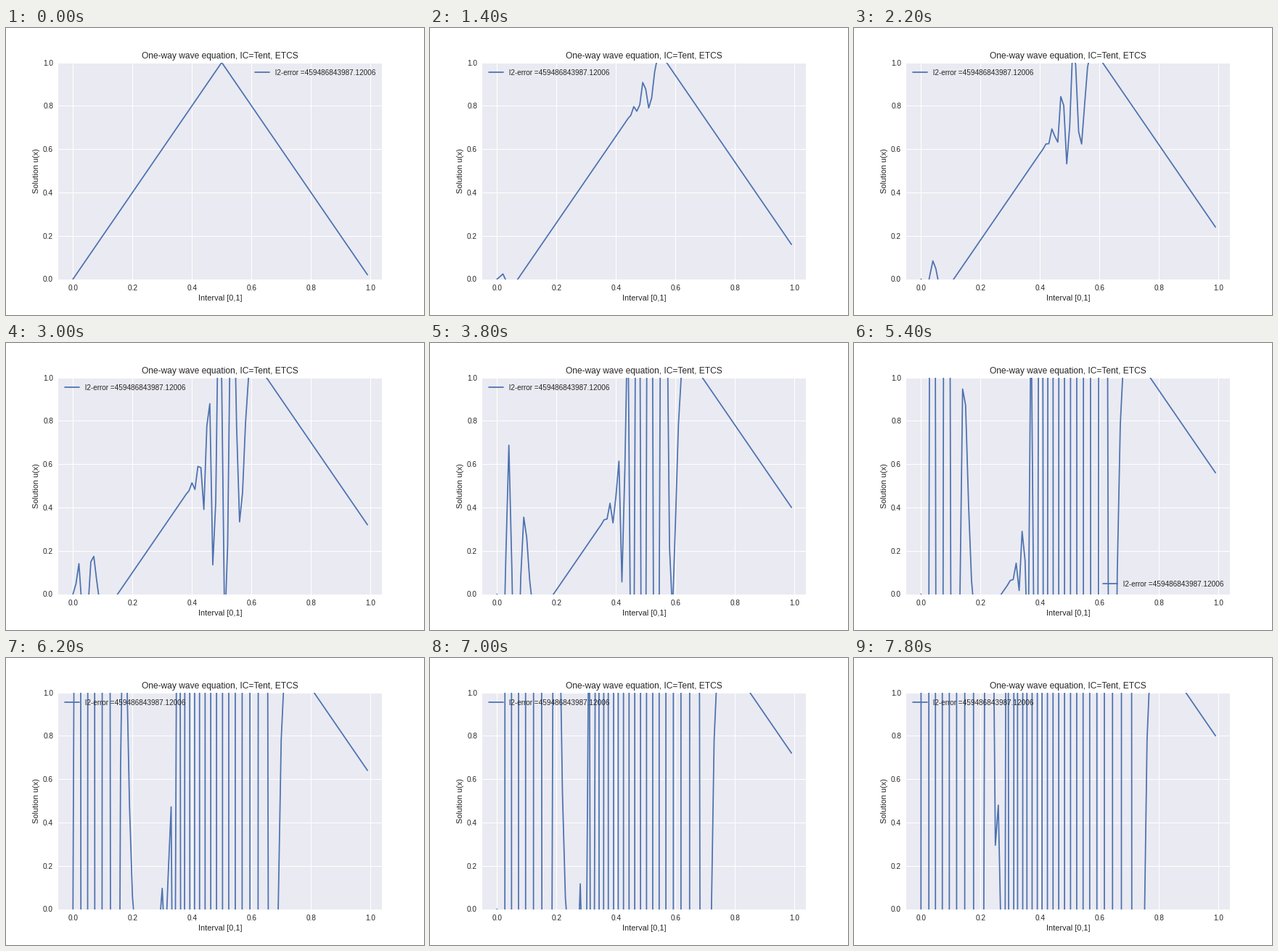
Recreate the animation shown at these times as a matplotlib script. Size 576 px wide and 396 px high, loop 8000 ms.

```python
import matplotlib.pyplot as plt
import numpy as np
from matplotlib.animation import FuncAnimation

FRAMES, INTERVAL = 40, 200
INK = "0.15"

plt.rcParams.update({
    "font.family": "Liberation Sans",
    "font.size": 10,
    "text.color": INK,
    "axes.labelcolor": INK,
    "xtick.color": INK,
    "ytick.color": INK,
    "axes.facecolor": "#EAEAF2",
    "axes.edgecolor": "white",
    "axes.linewidth": 0,
    "axes.grid": True,
    "axes.axisbelow": True,
    "axes.titlesize": 12,
    "axes.labelsize": 11,
    "grid.color": "white",
    "grid.linestyle": "-",
    "grid.linewidth": 1,
    "lines.linewidth": 1.75,
    "lines.solid_capstyle": "round",
    "xtick.major.size": 0,
    "ytick.major.size": 0,
    "xtick.major.pad": 7,
    "ytick.major.pad": 7,
    "legend.frameon": False,
    "legend.fontsize": 10,
    "figure.subplot.bottom": 0.125,
})


def step(u):
    """Forward Euler in time, central in space, Courant number 1."""
    new = u.copy()
    new[1:-1] -= (u[2:] - u[:-2]) / 2
    new[0] = 0
    new[-1] = u[-2]
    return new


x = np.arange(100) / 100
waves = [1 - 2 * np.abs(x - 0.5)]
for _ in range(FRAMES - 1):
    waves.append(step(waves[-1]))

fig, ax = plt.subplots(figsize=(8, 5.5), dpi=72)
line, = ax.plot(x, waves[0], color="#4C72B0",
                label="l2-error =459486843987.12006")
ax.set_ylim(0, 1)
ax.set_title("One-way wave equation, IC=Tent, ETCS")
ax.set_xlabel("Interval [0,1]")
ax.set_ylabel("Solution u(x)")
ax.legend(loc="best")


def draw(i):
    line.set_ydata(waves[i])
    return line,


def reset():
    return draw(0)


anim = FuncAnimation(fig, draw, frames=FRAMES, init_func=reset,
                     interval=INTERVAL, repeat=True, repeat_delay=0)
plt.show()
```
